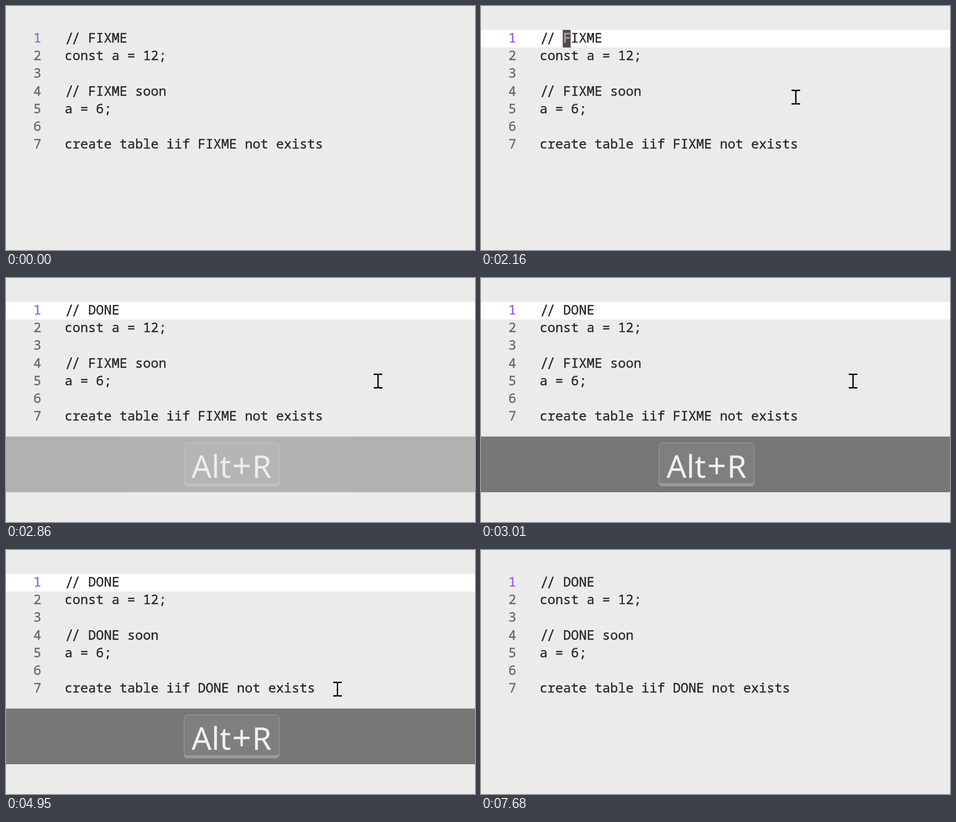
An HTML page that plays this animation: 1035x541 px, repeating every 7.75 s.

```html
<!DOCTYPE html>
<html lang="en">
<head>
<meta charset="utf-8">
<title>Editor replace</title>
<style>
  html, body { margin: 0; width: 100%; height: 100%; overflow: hidden; background: #ebebeb; }
  svg { display: block; width: 1035px; height: 541px; }
  text { white-space: pre; }
  .code { font: 28.8px "Noto Sans Mono", "DejaVu Sans Mono", monospace; color: #2c2a2e; fill: currentColor;
          stroke: currentColor; stroke-width: .5px; font-variant-ligatures: none; }
  .num { color: #6c6b5e; }
  .num.current { color: #9767dc; }
  .slash { font-size: 36px; stroke: none; }
  #caretChar { color: #a3b4ae; }
  .key { font: 69px "Noto Sans", "Open Sans", sans-serif; fill: #f0f0f0; }
  .plus { font-size: 74px; }
</style>
</head>
<body>
<svg viewBox="0 0 1035 541" xmlns="http://www.w3.org/2000/svg">
  <rect id="highlight" y="53" width="1035" height="39" fill="#fff"/>
  <g id="lines"></g>
  <g id="caret">
    <rect x="180.4" y="53" width="17.4" height="39" fill="#544a4c"/>
    <text id="caretChar" class="code"></text>
  </g>
  <g id="overlay">
    <rect y="351.5" width="1035" height="123.5" fill="#000" fill-opacity=".495"/>
    <rect x="392.5" y="365" width="211" height="97" rx="8" fill="#9a9a9a"/>
    <path d="M394 372q0-5.500 5.500-5.500h197q5.500 0 5.500 5.500v79q0 4-5.500 4h-197q-5.500 0-5.500-4z" fill="#7f7f7f"/>
    <text class="key" x="409.5" y="443">Alt</text>
    <text class="key plus" x="499" y="443">+</text>
    <text class="key" x="543" y="443">R</text>
  </g>
  <path id="pointer" fill="none" stroke="#000" stroke-width="3"
        d="M-9.500-15H-2L0-14L2-15H9.500M0-14V14M-9.500 15H-2L0 14L2 15H9.500"/>
</svg>
<script>
const LOOP = 7750, STEP = 77.4;
const LEFT = 129.5, ADVANCE = 17.28, BASE = 81, PITCH = 39.2;
const FOCUS = 1160, BLUR = 7680;
const BLINK = 990, BLINK_ON = 475;
const KEYS_IN = 2715, KEYS_FADE = 300, KEYS_OUT = 5170;
const POINTER_IN = 70, POINTER_OUT = 6590;

const lines = [
  { text: "// FIXME", doneAt: 2780 },
  { text: "const a = 12;" },
  { text: "" },
  { text: "// FIXME soon", doneAt: 3560 },
  { text: "a = 6;" },
  { text: "" },
  { text: "create table iif FIXME not exists", doneAt: 4180 }
];

const clamp = v => Math.min(1, Math.max(0, v));
const easeIn = p => p * p;
const easeOut = p => 1 - (1 - p) ** 3;
const easeInOut = p => p * p * (3 - 2 * p);

// Each move bends from the previous resting point through "via".
const pointerStart = [475, 399];
const moves = [
  { start: POINTER_IN, end: 610, via: [260, 225], to: [190, 69], ease: easeOut },
  { start: FOCUS, end: 1930, via: [430, 80], to: [688, 186], ease: easeInOut },
  { start: 1970, end: 2630, via: [690, 228], to: [821, 228.5], ease: easeInOut },
  { start: 4350, end: 4950, via: [785, 262], to: [731.5, 308.5], ease: easeInOut },
  { start: 6280, end: POINTER_OUT, via: [730, 400], to: [715, 560], ease: easeIn }
];

const el = id => document.getElementById(id);

function addText(className, x, y, content) {
  const node = document.createElementNS("http://www.w3.org/2000/svg", "text");
  node.setAttribute("class", className);
  node.setAttribute("x", x);
  node.setAttribute("y", y);
  node.textContent = content;
  el("lines").appendChild(node);
  return node;
}

lines.forEach((line, i) => {
  const y = BASE + i * PITCH;
  addText("code num" + (i ? "" : " current"), 60.5, y, i + 1);
  const isComment = line.text.startsWith("//");
  if (isComment) {
    // The two slashes sit close together, as a ligature
    addText("code slash", LEFT - 0.6, y + 3.5, "/");
    addText("code slash", LEFT + 14, y + 3.5, "/");
  }
  const skip = isComment ? 3 : 0;
  line.code = line.text.slice(skip);
  line.node = addText("code", LEFT + skip * ADVANCE, y, line.code);
});
el("caretChar").setAttribute("x", LEFT + 3 * ADVANCE);
el("caretChar").setAttribute("y", BASE);

function show(id, visible) {
  el(id).setAttribute("visibility", visible ? "visible" : "hidden");
}

function pointerAt(t) {
  return moves.reduce((from, { start, end, via, to, ease }) => {
    const k = ease(clamp((t - start) / (end - start)));
    return from.map((v, i) => (1 - k) ** 2 * v + 2 * k * (1 - k) * via[i] + k * k * to[i]);
  }, pointerStart);
}

function render(t) {
  // Motion advances in steps, like a screen recording
  const held = Math.floor((t + 14) / STEP) * STEP;

  lines.forEach(({ code, node, doneAt }) => {
    node.textContent = t >= doneAt ? code.replace("FIXME", "DONE") : code;
  });

  const focused = t >= FOCUS && t < BLUR;
  show("highlight", focused);
  show("caret", focused && (t - FOCUS) % BLINK < BLINK_ON);
  el("caretChar").textContent = lines[0].node.textContent[0];

  show("overlay", t < KEYS_OUT);
  el("overlay").setAttribute("opacity", clamp((held - KEYS_IN) / KEYS_FADE));

  show("pointer", t >= POINTER_IN && t < POINTER_OUT);
  el("pointer").setAttribute("transform", `translate(${pointerAt(held)})`);
}

const startTime = performance.now();
function tick() {
  render((performance.now() - startTime) % LOOP);
  requestAnimationFrame(tick);
}
render(0);
requestAnimationFrame(tick);
</script>
</body>
</html>
```
